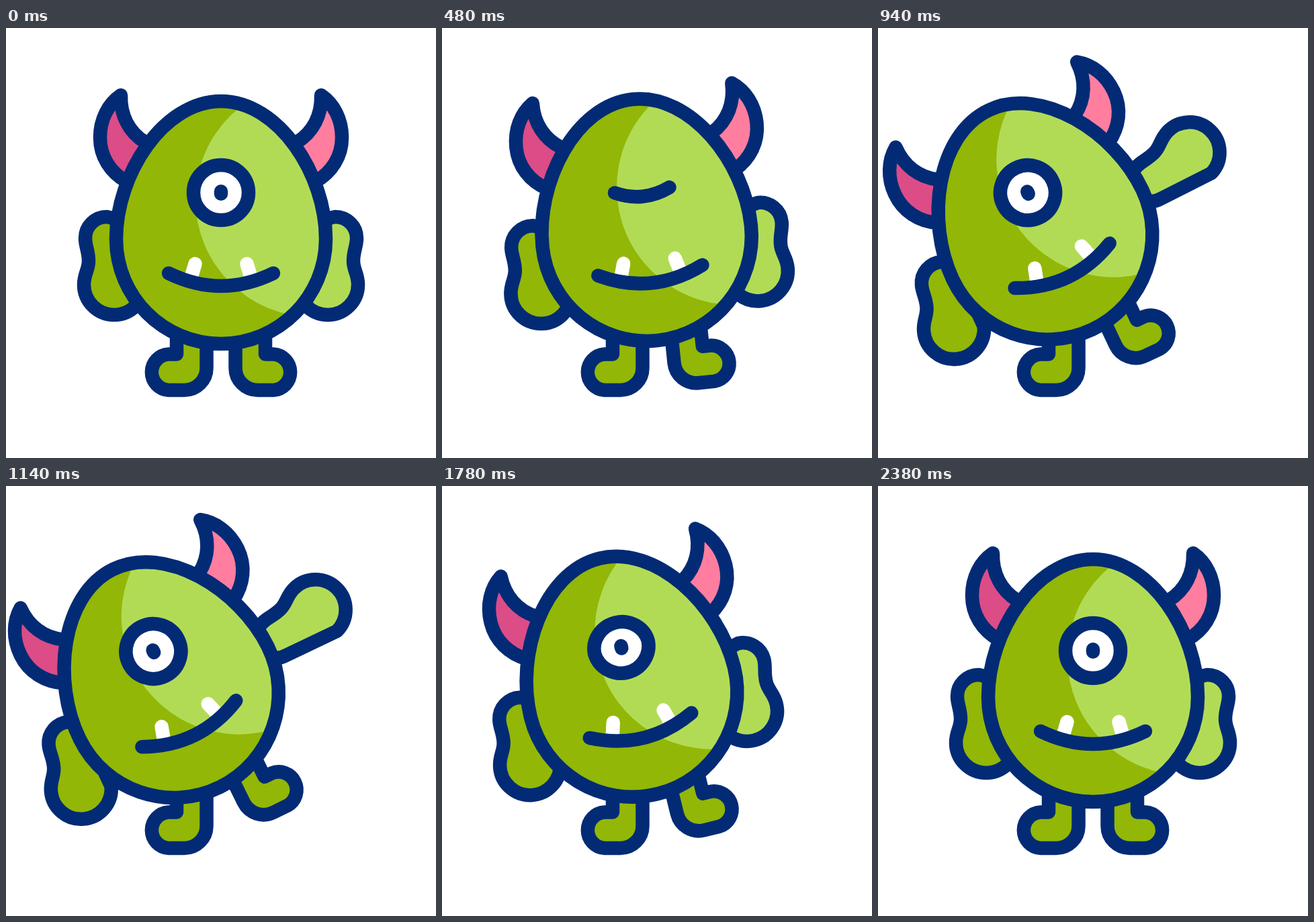
Recreate the animation shown at these times as an HTML page with a canvas. Size 640 by 640 pixels, loop 2.4 s.

```html
<!DOCTYPE html>
<html lang="en">
<head>
<meta charset="utf-8">
<title>Waving monster</title>
<style>
  html, body { margin: 0; width: 100%; height: 100%; overflow: hidden; background: #fff; }
  canvas { display: block; width: 640px; height: 640px; }
</style>
</head>
<body>
<canvas id="stage" width="640" height="640"></canvas>
<script>
const ctx = document.getElementById('stage').getContext('2d');
const LOOP = 2400, HALF = 1193, LEAN = 26.2;
const NAVY = '#032b75', GREEN = '#92b707', LIME = '#b2db55';
const ROSE = '#dc4c87', PINK = '#ff7ea0', WHITE = '#fff';
const LINE = 20.5;

const horn = new Path2D('M171 100C152 113 140 136 140 163C140 191 155 215 180 229L230 190L207 170C183 155 170 130 171 100Z');
const arm = new Path2D('M150 281A32 32 0 0 0 118 313C118 325 123 332 123 347C123 360 116 366 116 382A45 45 0 0 0 206 382L177 303Q172 285 150 281Z');
const leg = new Path2D('M254 455V485.5H242A26.8 26.8 0 0 0 242 539H265.5A33 33 0 0 0 298.5 506V455');
const egg = new Path2D('M320 109C406 109 476 218 476 314C476 400 406 470 320 470C234 470 164 400 164 314C164 218 234 109 320 109Z');
const shine = new Path2D('M632 255A175 175 0 1 1 282 255A175 175 0 1 1 632 255Z');
const mouth = new Path2D('M242 365Q320 403 398 365');
const tooth = new Path2D('M281.5 351L275 373');
const pupil = new Path2D('M320 243.2V246.8');

const mix = (a, b, k) => a + (b - a) * k;
const swing = u => (1 - Math.cos(Math.PI * u)) / 2;

// Symmetric cubic Bezier easing with handles at .73 and .27
function glide(x) {
  let lo = 0, hi = 1;
  for (let i = 0; i < 24; i++) {
    const s = (lo + hi) / 2;
    if (s * (2.19 + s * (-3.57 + s * 2.38)) < x) lo = s; else hi = s;
  }
  return lo * lo * (3 - 2 * lo);
}

const waveKeys = [[0, 0], [500, 0], [760, 138], [1050, 100], [1330, 140], [1590, 103], [1780, 0], [LOOP, 0]];

function waveAngle(t) {
  const i = waveKeys.findIndex(key => key[0] > t);
  const [t0, a0] = waveKeys[i - 1], [t1, a1] = waveKeys[i];
  return mix(a0, a1, swing((t - t0) / (t1 - t0)));
}

function lidClosure(t) {
  const away = Math.min(Math.abs(t - 480), Math.abs(t - 1673));
  return away < 130 ? swing(1 - away / 130) : 0;
}

function paint(path, fill, stroke = NAVY) {
  if (fill) { ctx.fillStyle = fill; ctx.fill(path); }
  if (stroke) { ctx.strokeStyle = stroke; ctx.stroke(path); }
}

function scoped(draw) {
  ctx.save();
  draw();
  ctx.restore();
}

function turn(degrees, x, y) {
  ctx.translate(x, y);
  ctx.rotate(degrees * Math.PI / 180);
  ctx.translate(-x, -y);
}

function mirrored(draw) {
  scoped(() => {
    ctx.translate(640, 0);
    ctx.scale(-1, 1);
    draw();
  });
}

function drawArm(angle, fill) {
  scoped(() => {
    turn(angle, 149, 309);
    paint(arm, fill);
  });
}

// The circle folds down into a smiling arc as it closes
function eyeShape(closed) {
  const path = new Path2D();
  const near = mix(41, 28, closed), mid = mix(22.6, 14, closed);
  const half = (from, dir) => {
    const sideY = 245 + mix(dir * 22.6, 6, closed);
    const midY = 245 + mix(dir * 41, 9.5, closed);
    path.bezierCurveTo(320 + from * near, sideY, 320 + from * mid, midY, 320, midY);
    path.bezierCurveTo(320 - from * mid, midY, 320 - from * near, sideY, 320 - from * 41, 245);
  };
  path.moveTo(279, 245);
  half(-1, -1);
  half(1, 1);
  path.closePath();
  return path;
}

function drawFace(t) {
  const eye = eyeShape(lidClosure(t));
  paint(eye, WHITE, null);
  scoped(() => {
    ctx.clip(eye);
    paint(pupil);
  });
  paint(eye);
  paint(tooth, null, WHITE);
  mirrored(() => paint(tooth, null, WHITE));
  paint(mouth);
}

function draw(t) {
  const lean = LEAN * glide(Math.max(0, 1 - Math.abs(t - HALF) / HALF));
  ctx.fillStyle = WHITE;
  ctx.fillRect(0, 0, 640, 640);
  ctx.lineWidth = LINE;
  ctx.lineCap = ctx.lineJoin = 'round';

  paint(leg, GREEN);
  scoped(() => {
    turn(-lean, 272, 462);
    drawArm(lean * 0.83, GREEN);
    paint(horn, ROSE);
    mirrored(() => {
      drawArm(waveAngle(t), LIME);
      paint(horn, PINK);
      paint(leg, GREEN);
    });
    paint(egg, GREEN, null);
    scoped(() => {
      ctx.clip(egg);
      paint(shine, LIME, null);
    });
    paint(egg);
    drawFace(t);
  });
}

const start = performance.now();
function tick() {
  draw((performance.now() - start) % LOOP);
  requestAnimationFrame(tick);
}
tick();
</script>
</body>
</html>
```
